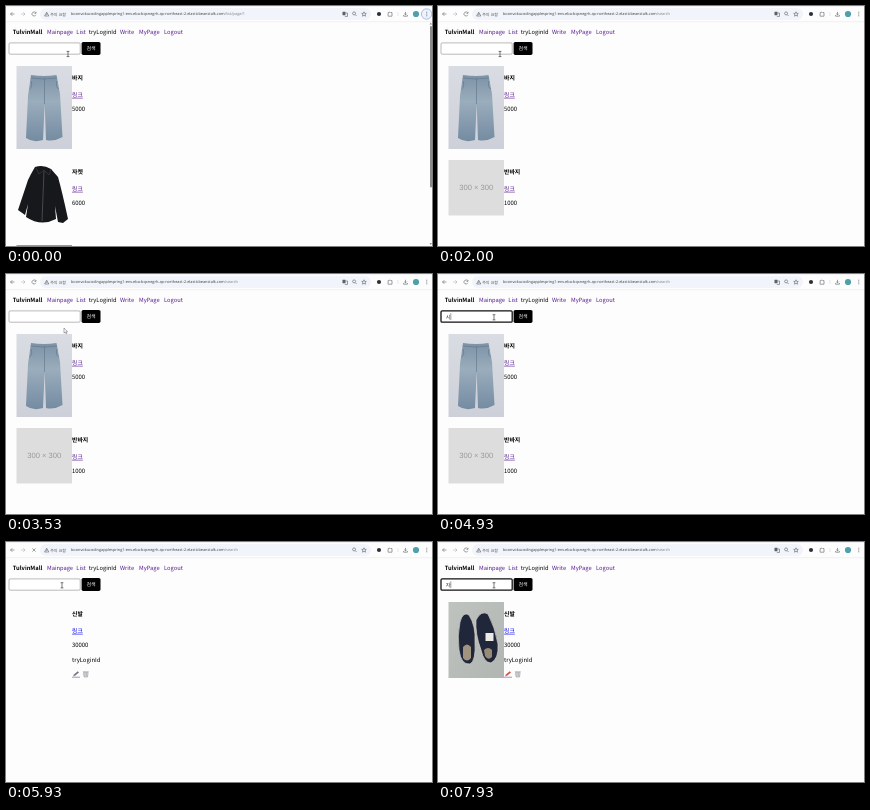
An HTML page that plays this animation: 426x240 px, repeating every 8 s.

```html
<!DOCTYPE html>
<html lang="ko">
<head>
<meta charset="utf-8">
<title>Shop search</title>
<style>
  html, body { margin: 0; height: 100%; overflow: hidden; background: #fdfdfd; }
  svg { display: block; width: 100vw; height: 100vh; }
  text { font: 5.9px "Noto Sans CJK KR", "Noto Sans CJK", sans-serif; text-rendering: geometricPrecision; }
  #nav text { font-size: 5.75px; }
  .bold { font-weight: 700; }
  .visited { fill: #551a8b; }
  .fresh { fill: #00e; }
  .under { text-decoration: underline; }
  .url { font: 3.86px "Open Sans", sans-serif; fill: #3a3d42; }
  .warn { font-size: 4px; fill: #555; }
  .dim { fill: #7d8288; }
  .icon { fill: none; stroke: #5a5e63; stroke-width: .6; }
</style>
</head>
<body>
<svg viewBox="0 0 426 240" preserveAspectRatio="none">
  <g id="toolbar">
    <rect x="34" y="2" width="331" height="12" rx="6" fill="#f1f4fa"/>
    <path d="M0 .4H426M0 15.7H426" stroke="#e6e8f0" stroke-width=".6"/>
    <path class="icon" d="M8.5 8H4.5M6.3 6.2L4.5 8L6.3 9.8"/>
    <path class="icon" d="M15 8H19M17.2 6.2L19 8L17.2 9.8" opacity=".45"/>
    <path class="icon" id="reload" d="M29.7 7A2 2 0 1 0 29.8 8.8M30 5.8V7.3H28.5"/>
    <path class="icon" id="stop" d="M26.4 6.4L29.6 9.6M29.6 6.4L26.4 9.6"/>
    <path class="icon" d="M38.6 10L40.7 6.2L42.8 10ZM40.7 7.4V9"/>
    <text class="warn" x="44.2" y="9.5">주의 요함</text>
    <text class="url" x="65" y="9.3">boonvokucodingapplespring1-env.eba-bqxnegrh.ap-northeast-2.elasticbeanstalk.com<tspan class="dim" id="path"></tspan></text>
    <g id="translate">
      <rect x="336.5" y="5.7" width="3" height="3.6" rx=".4" fill="#5b6066"/>
      <path class="icon" d="M339.5 7H341.5V10.4H338.8"/>
    </g>
    <path class="icon" d="M349.3 8.7L350.6 10M349.6 7.4A1.5 1.5 0 1 1 346.6 7.4A1.5 1.5 0 1 1 349.6 7.4"/>
    <path class="icon" d="M358 5.8L358.7 7.4L360.3 7.5L359.1 8.6L359.5 10.2L358 9.3L356.5 10.2L356.9 8.6L355.7 7.5L357.3 7.4Z"/>
    <circle cx="373" cy="8" r="2.1" fill="#2b303a"/>
    <path class="icon" d="M382.1 6.6H383.2Q384 5 384.8 6.6H386V10.2H382.1Z"/>
    <path d="M392 6V10" stroke="#d3d8e4" stroke-width=".6"/>
    <path class="icon" d="M399.5 5.8V8.8M398.2 7.6L399.5 8.9L400.8 7.6M397.6 9V10.2H401.4V9"/>
    <circle cx="410" cy="8" r="3.1" fill="#4f9fad"/>
    <circle id="menuGlow" cx="420.6" cy="8" r="5.2" fill="#edf2fd" stroke="#86a5ea" stroke-width=".7"/>
    <path d="M420.8 6.2h.01M420.8 8h.01M420.8 9.8h.01" stroke="#474b50" stroke-width=".9" stroke-linecap="round"/>
  </g>

  <g id="nav">
    <text class="bold" x="6.8" y="28.4">TulvinMall</text>
    <text class="visited" x="41" y="28.4">Mainpage</text>
    <text class="visited" x="70.3" y="28.4">List</text>
    <text x="82.8" y="28.4">tryLoginId</text>
    <text class="visited" x="114" y="28.4">Write</text>
    <text class="visited" x="133" y="28.4">MyPage</text>
    <text class="visited" x="158" y="28.4">Logout</text>
  </g>

  <rect id="field" x="3" y="36.9" width="71.2" height="11.3" rx="1.2" fill="#fff"/>
  <text id="typed" x="7.8" y="44.9" style="font-size:5.2px" fill="#333"></text>
  <path id="caret" d="M0 39.4V46" stroke="#000" stroke-width=".4"/>
  <rect x="75.6" y="36" width="18.9" height="12.9" rx="1.6"/>
  <text x="85.1" y="44.3" text-anchor="middle" fill="#fff" style="font-size:5px">검색</text>

  <g id="content"></g>

  <g id="scrollbar" fill="#8b8b8b">
    <path d="M424.8 16.5L426 18.5H423.6ZM424.8 239L426 237H423.6Z"/>
    <rect x="424" y="20" width="2" height="161.5" rx="1"/>
  </g>

  <path id="beam" d="M-1.4 -2.6H1.4M-1.4 2.6H1.4M0 -2.6V2.6" stroke="#222" stroke-width=".6"/>
  <path id="arrow" d="M0 0V5L1.2 4L2 5.7L2.8 5.3L2.1 3.7H3.6Z" fill="#fff" stroke="#333" stroke-width=".4"/>
</svg>

<script>
const $ = id => document.getElementById(id);
const show = (id, on) => $(id).setAttribute('display', on ? 'inline' : 'none');

const photos = {
  jeans: `<rect x="10.5" y="60" width="55.5" height="83" fill="url(#studio)"/>
    <path d="M25 69Q38 71 50.5 69L54 88L56.5 131Q48 136 40 134L38.7 98L37 134Q27 137 20 132L22 90Z" fill="url(#denim)"/>
    <path d="M25 72Q38 74 51 72M38.5 72V98M25 75Q27 81 23.5 83M51 75Q49 81 53 83" fill="none" stroke="#5f7489" stroke-width=".6"/>`,
  jacket: `<path d="M29 161Q37 158 45 163L52 171Q56 185 62 213L57 217L52 216L49 200L50 213Q35 221 20 211L22 198L19 209L12 204L22 174L25 168Z" fill="#17181b"/>
    <path d="M30 162L33 168L38 164L43 169L45 163" fill="none" stroke="#3c3e43" stroke-width=".7"/>
    <path d="M38 165L36 215" stroke="#77797d" stroke-width=".5"/>`,
  blank: `<rect x="10.5" y="154" width="55.5" height="55.5" fill="#ddd"/>
    <text x="38.2" y="184.4" text-anchor="middle" fill="#999" style="font:7.6px 'Liberation Sans',sans-serif">300 × 300</text>`,
  shoes: `<rect x="10.5" y="60" width="55.5" height="76" fill="url(#floor)"/>
    <path d="M22 80Q25 69 31 73Q38 84 37 100Q38 119 32 122Q23 123 21 108Q19 94 22 80Z" fill="#20273a" stroke="#d6d4cb" stroke-width=".7"/>
    <path d="M25 105Q29 100 33 105L33 116Q29 121 25 116Z" fill="#a0947f"/>
    <path d="M38 78Q43 68 50 72Q57 85 60 102Q61 117 53 121Q46 121 43 108Q37 92 38 78Z" fill="#20273a" stroke="#d6d4cb" stroke-width=".7"/>
    <path d="M46 108Q50 104 54 108L54 115Q50 119 47 114Z" fill="#978b78"/>
    <rect x="47.5" y="91" width="8" height="8" fill="#eceae6"/>`
};

const defs = `<defs>
  <linearGradient id="studio" x2="0" y2="1"><stop stop-color="#d9dce2"/><stop offset="1" stop-color="#cdd0d8"/></linearGradient>
  <linearGradient id="denim" x2="0" y2="1"><stop stop-color="#7d92a6"/><stop offset=".4" stop-color="#9aadbd"/><stop offset="1" stop-color="#748ba1"/></linearGradient>
  <linearGradient id="floor" x2="1" y2="1"><stop stop-color="#bfc3bf"/><stop offset="1" stop-color="#b2b6b2"/></linearGradient>
</defs>`;

const row = (y, photo, name, price, link = 'visited') => `<g class="photo">${photos[photo]}</g>
  <text class="bold" x="66" y="${y}">${name}</text>
  <text class="${link} under" x="66" y="${y + 16.6}">링크</text>
  <text x="66" y="${y + 31.2}">${price}</text>`;

const editTools = `<text x="66" y="119.7">tryLoginId</text>
  <path id="pencil" d="M67.3 134.2L67.9 132.4L71.8 129.2L73 130.5L69 133.7Z"/>
  <path d="M66 135.2H74" stroke="#551a8b" stroke-width=".5"/>
  <path d="M77.4 130.6H82.2L81.5 135H78.1ZM76.9 129.7H82.7M79 131V134.5M80.6 131V134.5" fill="#e2e4e6" stroke="#95999d" stroke-width=".6"/>`;

const pages = {
  list: row(74.2, 'jeans', '바지', 5000) + row(168.2, 'jacket', '자켓', 6000) +
    '<rect x="10.5" y="239" width="55.5" height="1" fill="#999"/>',
  pants: row(74.2, 'jeans', '바지', 5000) + row(168.2, 'blank', '반바지', 1000),
  shoes: row(74.2, 'shoes', '신발', 30000, 'fresh') + editTools
};

// Timelines: [start in ms, value]
const pageLine = [[0, 'list'], [1870, 'pants'], [5870, 'shoes']];
const loadLine = [[0, false], [1800, true], [1930, false], [5600, true], [6200, false]];
const focusLine = [[0, false], [200, true], [1870, false], [3800, true], [5870, false], [7330, true]];
const typeLine = [[0, ''], [1070, 'ㅂ'], [1140, '바'], [1270, '바ㅈ'], [1400, '바지'], [1870, ''],
  [4730, 'ㅅ'], [4860, '시'], [5070, '신'], [5200, '신ㅂ'], [5330, '신바'], [5530, '신발'], [5870, ''],
  [7800, 'ㅈ'], [7900, '자']];
const mouseLine = [[0, 62, 48], [2500, 62, 48], [2900, 61, 148], [3350, 58, 56], [3550, 58, 54], [3780, 56, 43.3], [8000, 56, 43.3]];

const at = (line, t) => line.findLast(step => step[0] <= t);

function mouseAt(t) {
  const i = mouseLine.findIndex(key => key[0] > t);
  const [t0, x0, y0] = mouseLine[i - 1], [t1, x1, y1] = mouseLine[i];
  const u = (t - t0) / (t1 - t0), ease = u * u * (3 - 2 * u);
  return [x0 + (x1 - x0) * ease, y0 + (y1 - y0) * ease];
}

let current;
function draw() {
  const t = performance.now() % 8000;
  const page = at(pageLine, t)[1], loading = at(loadLine, t)[1];
  const [focusTime, focused] = at(focusLine, t), [typeTime, typed] = at(typeLine, t);

  if (page !== current) {
    $('content').innerHTML = defs + pages[page];
    $('path').textContent = page === 'list' ? '/list/page/1' : '/search';
    current = page;
  }
  const pending = loading && t >= at(pageLine, t)[0] && page !== 'list' && !typed;
  document.querySelectorAll('.photo').forEach(p => p.setAttribute('display', pending ? 'none' : 'inline'));
  $('pencil')?.setAttribute('fill', pending ? '#777' : '#cf5145');
  show('reload', !loading);
  show('stop', loading);
  show('translate', !pending);
  show('scrollbar', page === 'list');
  show('menuGlow', t < 200);

  $('field').setAttribute('stroke', focused ? '#101010' : '#808080');
  $('field').setAttribute('stroke-width', focused ? 1.3 : .55);
  $('typed').textContent = typed;
  show('caret', focused && (t - Math.max(focusTime, typeTime)) % 1000 < 500);
  $('caret').setAttribute('transform', `translate(${8 + typed.length * 4.8} 0)`);

  const [x, y] = mouseAt(t);
  const overText = y < 49;
  show('beam', overText);
  show('arrow', !overText);
  $(overText ? 'beam' : 'arrow').setAttribute('transform', `translate(${x} ${y})`);
  requestAnimationFrame(draw);
}
draw();
</script>
</body>
</html>
```
